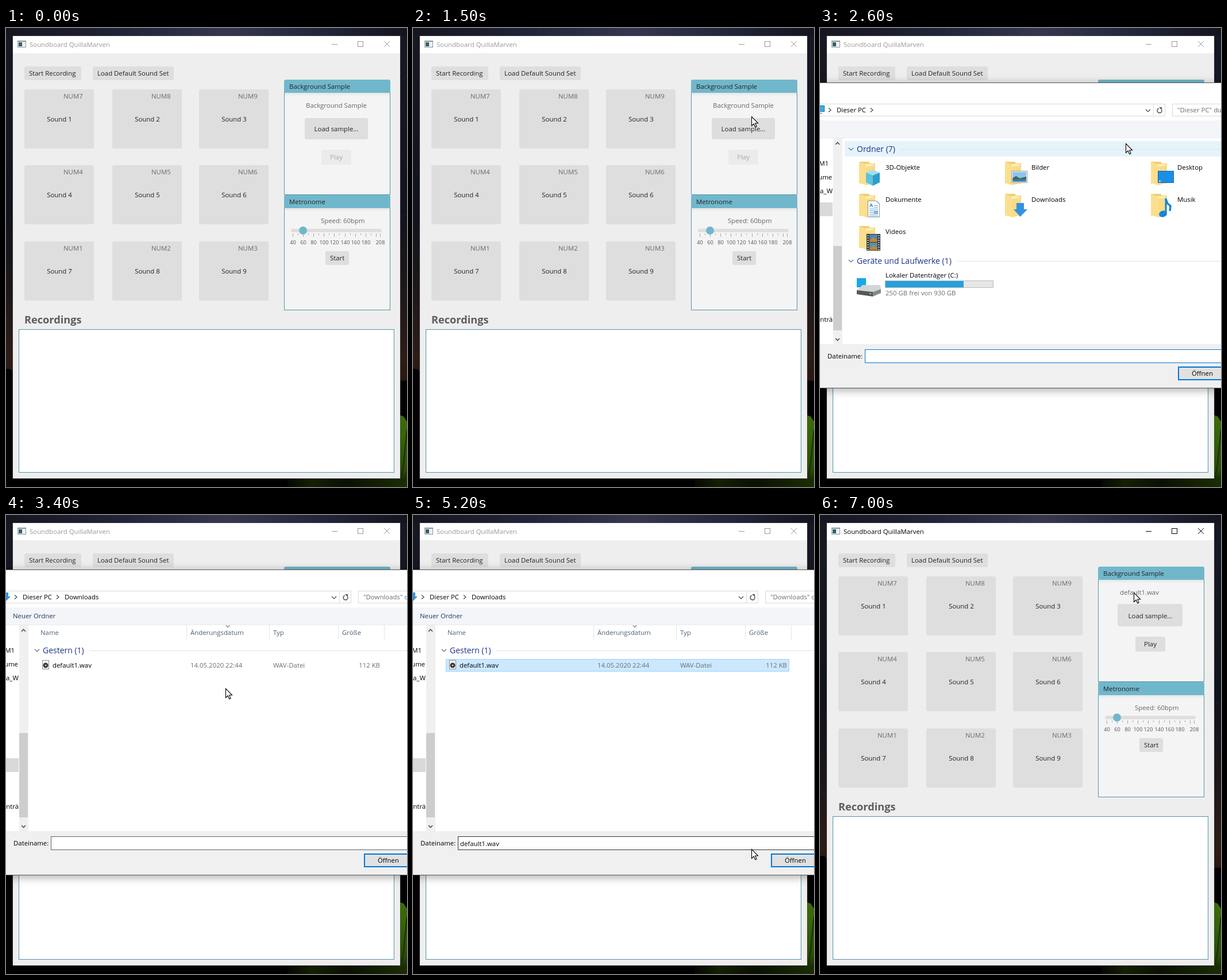
An HTML page with a canvas for the animation above (7.1 s loop, 698x800 px).

```html
<!DOCTYPE html>
<html lang="en">
<head>
<meta charset="utf-8">
<title>Soundboard</title>
<style>
html, body { margin: 0; width: 100%; height: 100%; overflow: hidden; background: #000; }
canvas { display: block; width: 698px; height: 800px; }
</style>
</head>
<body>
<canvas id="stage" width="698" height="800"></canvas>
<script>
const W = 698, H = 800, LOOP = 7100, STEP = 100, PAD = 100;
const TEAL = '#71b7cb', EDGE = '#5295a8', GREY = '#dedede', BLUE = '#0078d7';
const stage = document.getElementById('stage').getContext('2d');
let g = stage;

function layer(w) {
  const c = document.createElement('canvas');
  c.width = w;
  c.height = H;
  return c;
}
const desktop = layer(W), sheet = layer(W + 2 * PAD);

// drawing helpers
function box(x, y, w, h, fill, r = 0) {
  g.fillStyle = fill;
  g.beginPath();
  g.roundRect(x, y, w, h, r);
  g.fill();
}
function frame(x, y, w, h, color) {
  g.strokeStyle = color;
  g.lineWidth = 1;
  g.strokeRect(x + 0.5, y + 0.5, w - 1, h - 1);
}
function text(s, x, y, color = '#222', size = 11.4, align = 'left', weight = 400) {
  g.font = `${weight} ${size}px "Open Sans", "Noto Sans", sans-serif`;
  g.textAlign = align;
  g.fillStyle = color;
  g.fillText(s, x, y);
}
function trace(pts) {
  g.beginPath();
  for (let i = 0; i < pts.length; i += 2) g.lineTo(pts[i], pts[i + 1]);
}
function poly(pts, fill) {
  trace(pts);
  g.closePath();
  g.fillStyle = fill;
  g.fill();
}
function line(pts, color, width = 1) {
  trace(pts);
  g.strokeStyle = color;
  g.lineWidth = width;
  g.stroke();
}
function disc(x, y, r, fill) {
  g.fillStyle = fill;
  g.beginPath();
  g.arc(x, y, r, 0, 7);
  g.fill();
}
function ramp(x0, y0, x1, y1, stops) {
  const gr = g.createLinearGradient(x0, y0, x1, y1);
  stops.forEach(([p, c]) => gr.addColorStop(p, c));
  return gr;
}
const down = (x, y, color, s = 4) => line([x - s, y - s / 2, x, y + s / 2, x + s, y - s / 2], color, 1.2);
const right = (x, y) => line([x - 2, y - 3.5, x + 2, y, x - 2, y + 3.5], '#444', 1.2);

function paintDesktop() {
  g = desktop.getContext('2d');
  box(0, 0, W, H, ramp(0, 0, 0, H, [[0, '#161823'], [0.4, '#11131c'], [0.58, '#1d1719'],
    [0.72, '#2c1c16'], [0.765, '#2a1810'], [0.78, '#040404'], [1, '#000']]));
  box(0, 0, W, 14, ramp(0, 0, W, 0, [[0, '#14161f'], [0.3, '#22243a'], [0.55, '#36374e'],
    [0.8, '#22243a'], [1, '#12141d']]));
  let seed = 11;
  const rnd = () => (seed = seed * 16807 % 2147483647) / 2147483647;
  for (let i = 0; i < 900; i++) {
    const x = rnd() * W, y = rnd() * 560, a = rnd() * 0.3;
    if (y < 14 || x < 12 || x > 686) box(x, y, 1, 1, `rgba(190,195,225,${a})`);
  }
  box(0, 594, 12, 206, '#020202', [0, 8, 0, 0]);
  box(686, 615, 12, 185, '#020202');
  poly([686, 675, 692, 677, 698, 686, 698, 800, 686, 800],
    ramp(0, 675, 0, 800, [[0, '#3c6d08'], [0.3, '#366406'], [0.75, '#284b05'], [1, '#0d1802']]));
  box(490, 785, 208, 15, ramp(490, 0, 698, 0, [[0, '#050802'], [0.2, '#141f04'], [0.5, '#0a1003'], [1, '#1b2d04']]));
  line([687, 790, 692, 760, 698, 700], '#192d04', 2);
}

function button(label, x, y, w, h, tx, base) {
  box(x, y, w, h, GREY, 3);
  text(label, tx, base);
}

function panel(title, y, h) {
  box(484, y, 185, h, '#f4f4f4', [3, 3, 0, 0]);
  box(485, y + 23, 183, 6, ramp(0, y + 23, 0, y + 29, [[0, '#e4e6e7'], [1, '#f4f4f4']]));
  frame(484, y + 22, 185, h - 22, EDGE);
  box(484, y, 185, 23, TEAL, [3, 3, 0, 0]);
  text(title, 493, y + 16);
}

function appWindow(active, loaded, focused) {
  const ink = active ? '#000' : '#999';
  box(11, 13, 676, 773, 'rgba(70,70,75,.55)');
  box(12, 14, 674, 771, '#eee');
  box(12, 14, 674, 30, '#fff');
  box(20, 22, 15, 12, '#8b9399');
  box(21, 24, 13, 9, '#eef2f4');
  box(22, 25, 6, 7, '#31606b');
  text('Soundboard QuillaMarven', 41, 33, ink);
  line([567, 28.5, 577, 28.5], ink);
  frame(612, 23, 10, 10, ink);
  line([658, 23, 668, 33], ink);
  line([668, 23, 658, 33], ink);

  button('Start Recording', 32, 67, 99, 24, 40, 83);
  button('Load Default Sound Set', 151, 67, 141, 24, 159, 83);
  [107, 239, 372].forEach((y, r) => [32, 185, 336].forEach((x, c) => {
    box(x, y, 121, 103, GREY, 3);
    text('NUM' + (7 - 3 * r + c), x + 68, y + 16, '#696969');
    text('Sound ' + (3 * r + c + 1), x + 61, y + 56, '#222', 11.4, 'center');
  }));

  panel('Background Sample', 90, 201);
  text(loaded ? 'default1.wav' : 'Background Sample', 522, 139, '#666');
  if (focused) box(518, 155, 113, 39, GREY, 4);
  else box(520, 157, 110, 37, GREY, 3);
  text('Load sample...', 575, 180, '#222', 11.4, 'center');
  box(549, 212, 52, 26, loaded ? GREY : '#ebebeb', 3);
  text('Play', 575, 229, loaded ? '#222' : '#a9a9a9', 11.4, 'center');

  panel('Metronome', 291, 201);
  text('Speed: 60bpm', 548, 340, '#666');
  box(496, 350, 158, 6, GREY, 3);
  for (let bpm = 40; bpm <= 208; bpm += bpm < 200 ? 10 : 8) {
    const x = Math.round(499 + (bpm - 40) * 0.905), major = bpm % 20 === 0 || bpm === 208;
    box(x, 358, 1, major ? 6 : 3, '#a8a8a8');
    if (major && bpm !== 200) text(bpm, x + 0.5, 377, '#555', 9.2, 'center');
  }
  disc(517, 353, 7, TEAL);
  button('Start', 556, 389, 41, 24, 564, 405);

  text('Recordings', 32, 515, '#5f5b5f', 18.2, 'left', 700);
  box(22, 525, 654, 250, '#fff');
  frame(22, 525, 654, 250, EDGE);
}

const badges = {
  '3D-Objekte'() {
    poly([12, 20, 24, 15, 36, 20, 24, 25], '#9fe0f2');
    poly([12, 20, 24, 25, 24, 43, 12, 37], '#5fc0e0');
    poly([36, 20, 24, 25, 24, 43, 36, 37], '#2f9dc8');
  },
  Bilder() {
    box(11, 17, 28, 21, '#fff');
    frame(11, 17, 28, 21, '#999');
    box(13, 19, 24, 17, '#8cc4ee');
    poly([13, 30, 19, 26, 26, 30, 37, 27, 37, 32, 13, 32], '#3f6a55');
    box(13, 32, 24, 4, '#3f80b8');
  },
  Desktop() {
    box(12, 17, 28, 21, '#0b67b8');
    box(13, 18, 26, 19, '#1a8fe6');
    box(14, 34, 3, 2, '#d4ecff');
  },
  Dokumente() {
    poly([15, 13, 31, 13, 36, 18, 36, 42, 15, 42], '#8f9aa3');
    poly([16, 14, 30, 14, 35, 19, 35, 41, 16, 41], '#fff');
    text('A', 18, 24, '#2c82c9', 9, 'left', 700);
    for (let y = 21; y < 40; y += 3) box(y < 26 ? 26 : 18, y, y < 26 ? 7 : 15, 1, '#6aa2cf');
    box(26, 30, 7, 7, '#86b8dd');
  },
  Downloads() {
    poly([20, 17, 33, 17, 33, 28, 39, 28, 26.5, 41, 15, 28, 20, 28], '#3392e0');
  },
  Musik() {
    line([26, 37, 26, 9], '#1487d8', 3);
    line([26, 10, 29, 18, 34, 22, 33, 31], '#1487d8', 3.5);
    g.fillStyle = '#1487d8';
    g.beginPath();
    g.ellipse(21, 36, 7, 5.5, -0.3, 0, 7);
    g.fill();
  },
  Videos() {
    box(13, 15, 24, 29, '#333');
    box(18, 16, 14, 13, '#4b86b4');
    box(18, 30, 14, 13, '#5b8db0');
    poly([18, 27, 25, 20, 32, 26, 32, 29, 18, 29], '#b88b35');
    poly([18, 41, 26, 34, 32, 40, 32, 43, 18, 43], '#b88b35');
    for (let y = 17; y < 43; y += 4) {
      box(14.5, y, 2, 2, '#eee');
      box(33.5, y, 2, 2, '#eee');
    }
  }
};

function folder(name, x, y) {
  g.save();
  g.translate(x, y);
  poly([0, 1, 17, 1, 19, 4, 28, 4, 28, 39, 0, 39], '#f0cf72');
  poly([11, 5, 26, 5, 26, 37, 11, 37], '#fbeeb8');
  poly([0, 1, 12, 6, 13, 42, 0, 38], '#fbdf8c');
  poly([12, 10, 28, 7, 28, 38, 13, 42], '#f8dc86');
  badges[name]();
  g.restore();
  text(name, x + 46, y + 15, '#000');
}

function group(label, y, from) {
  down(54, y, '#5a6b8c');
  text(label, 64, y + 5, '#1e3287', 14);
  box(from, y, 760 - from, 1, '#e2e2e2');
}

function placesView(cur) {
  if (inside(cur, 43, 197, 760, 225)) box(43, 197, 717, 27, '#e5f3fb');
  if (inside(cur, 317, 284, 566, 336)) box(317, 284, 249, 52, '#e5f3ff');
  group('Ordner (7)', 211, 139);
  Object.keys(badges).forEach((name, i) => folder(name, 68 + 254 * (i % 3), 232 + 56 * Math.floor(i / 3)));
  group('Geräte und Laufwerke (1)', 406, 237);
  box(64, 436, 16, 16, '#19a7e8');
  poly([64, 457, 74, 448, 105, 448, 106, 455, 92, 460], '#d2d4d6');
  poly([64, 457, 92, 460, 92, 468, 64, 464], '#55585b');
  poly([92, 460, 106, 455, 106, 462, 92, 468], '#85898c');
  box(86, 462, 3, 2, '#5fe36a');
  text('Lokaler Datenträger (C:)', 114, 435, '#000');
  box(113, 440, 189, 13, '#e6e6e6');
  box(114, 441, 136, 11, '#26a0da');
  frame(113, 440, 189, 13, '#bcbcbc');
  text('250 GB frei von 930 GB', 114, 466, '#6d6d6d');
}

function filesView(cur, picked) {
  [['Name', 60], ['Änderungsdatum', 321], ['Typ', 465], ['Größe', 585]].forEach(([s, x]) => text(s, x, 209, '#4c607a'));
  [314, 458, 578, 658].forEach(x => box(x, 192, 1, 25, '#e5e5e5'));
  down(386, 194, '#777', 3);
  group('Gestern (1)', 236, 145);
  if (picked) {
    box(57, 251, 598, 22, '#cce8ff');
    frame(57, 251, 598, 22, '#99d1ff');
  } else if (inside(cur, 57, 251, 655, 273)) box(57, 251, 598, 22, '#e5f3ff');
  box(63, 253, 12, 16, '#fafafa');
  frame(63, 253, 12, 16, '#8a8a8a');
  disc(69, 262, 4.5, '#3a3434');
  disc(69, 262, 1.5, '#e0c8a0');
  text('default1.wav', 81, 266, '#000');
  text('14.05.2020 22:44', 321, 266, '#6d6d6d');
  text('WAV-Datei', 465, 266, '#6d6d6d');
  text('112 KB', 651, 266, '#6d6d6d', 11.4, 'right');
}

function sidebar(inFiles) {
  box(-60, inFiles ? 424 : 304, 82, 24, '#d9d9d9');
  [['M1', 15, 240], ['Dokume', 21, 264], ['a_W', 22, 288], ['Datenträ', 22, 512]]
    .forEach(([s, x, y]) => text(s, x, y, '#000', 11.4, 'right'));
  box(23, 192, 16, 359, '#f0f0f0');
  box(23, 380, 15, 147, '#cdcdcd');
  line([27, 203, 30.5, 199.5, 34, 203], '#505050', 1.6);
  line([27, 541, 30.5, 544.5, 34, 541], '#505050', 1.6);
}

function dialog(t, cur) {
  const inFiles = t >= 3300, picked = t >= 4300, sent = t >= 5700;
  const place = inFiles ? 'Downloads' : 'Dieser PC';
  g = sheet.getContext('2d');
  g.setTransform(1, 0, 0, 1, PAD, 0);
  g.clearRect(-PAD, 0, W + 2 * PAD, H);
  box(-60, 95, 820, 533, '#5a5a5a');
  box(-59, 96, 818, 531, '#fff');

  frame(-40, 132, 641, 22, '#d9d9d9');
  box(580, 132, 1, 22, '#d9d9d9');
  if (inFiles) poly([-3, 135, 4, 135, 4, 142, 8, 142, 0, 150, -8, 142, -3, 142], '#3392e0');
  else {
    box(-8, 135, 16, 11, '#35647f');
    box(-7, 136, 14, 9, '#32b0ee');
    box(-4, 148, 8, 1, '#57707e');
  }
  right(17, 143);
  text('Dieser PC', 29, 147, '#000');
  right(90, 143);
  if (inFiles) text('Downloads', 102, 147, '#000');
  down(571, 144, '#444');
  g.beginPath();
  g.arc(591, 144, 4, -0.5, 4.4);
  g.strokeStyle = '#555';
  g.lineWidth = 1.5;
  g.stroke();
  poly([590, 138, 595, 138, 595, 143], '#555');
  frame(613, 132, 130, 22, '#d9d9d9');
  text(`"${place}" durchsuchen`, 622, 147, '#6d6d6d');

  box(-59, 161, 818, 30, '#f4f5f9');
  box(-59, 191, 818, 1, '#e9ebf0');
  if (inFiles) text('Neuer Ordner', 12, 180, '#1e395b');
  if (inFiles) filesView(cur, picked);
  else placesView(cur);
  sidebar(inFiles);

  box(-59, 551, 818, 76, '#f0f0f0');
  text('Dateiname:', 13, 576, '#000');
  box(78, 560, 660, 24, '#fff');
  frame(78, 560, 660, 24, picked ? '#333' : inFiles ? '#5a6472' : BLUE);
  if (sent) box(82, 564, 68, 16, BLUE);
  if (picked) text('default1.wav', 82, 577, sent ? '#fff' : '#000');
  box(623, 590, 86, 24, BLUE);
  box(625, 592, 82, 20, inside(cur, 623, 590, 709, 614) ? '#e5f1fb' : '#e1e1e1');
  text('Öffnen', 647, 606, '#000');
  g = stage;
}

// time, x, y of the pointer tip
const path = [
  [1300, 642, 660], [1400, 602, 440], [1500, 589, 154], [1700, 583, 173], [2100, 582, 175],
  [2600, 532, 201], [3100, 384, 301], [3400, 382, 302], [3600, 355, 300], [4100, 130, 260],
  [4300, 118, 258], [4400, 118, 258], [4700, 193, 308], [4900, 350, 404], [5000, 432, 470],
  [5200, 589, 582], [5500, 640, 602], [5800, 639, 603], [6000, 637, 603], [6200, 626, 545],
  [6700, 556, 160], [7000, 546, 135]
];
function pointer(t) {
  const i = path.findIndex(p => p[0] > t);
  if (i === 0) return null;
  if (i < 0) return path[path.length - 1].slice(1);
  const [t0, x0, y0] = path[i - 1], [t1, x1, y1] = path[i], k = (t - t0) / (t1 - t0);
  return [Math.round(x0 + (x1 - x0) * k), Math.round(y0 + (y1 - y0) * k)];
}
function inside(p, x0, y0, x1, y1) {
  return p && p[0] >= x0 && p[0] < x1 && p[1] >= y0 && p[1] < y1;
}
function drawPointer([x, y]) {
  g.save();
  g.translate(x + 0.5, y + 0.5);
  trace([0, 0, 0, 16, 3.7, 12.5, 6.2, 18.3, 8.6, 17.2, 6.2, 11.6, 11, 11.3]);
  g.closePath();
  g.fillStyle = '#fff';
  g.fill();
  g.strokeStyle = '#000';
  g.lineWidth = 1.1;
  g.stroke();
  g.restore();
}

// opacity and scale of the file dialog
function dialogPose(t) {
  if (t < 2100 || t > 6000) return null;
  if (t === 2100) return [0.55, 0.975];
  if (t === 5900) return [0.5, 0.978];
  if (t === 6000) return [0.06, 0.956];
  return [1, 1];
}

function draw(t) {
  const cur = pointer(t), pose = dialogPose(t);
  g = stage;
  g.drawImage(desktop, 0, 0);
  const active = (t >= 1800 && t < 2100) || t >= 5900;
  appWindow(active, t >= 5900, t >= 1800);
  if (pose) {
    const [alpha, k] = pose;
    dialog(t, cur);
    g.save();
    g.globalAlpha = alpha;
    g.translate(340, 359);
    g.scale(k, k);
    g.translate(-340 - PAD, -359);
    g.shadowColor = 'rgba(0,0,0,.35)';
    g.shadowBlur = 16;
    g.shadowOffsetY = 3;
    g.drawImage(sheet, 0, 0);
    g.restore();
  }
  if (cur) drawPointer(cur);
}

paintDesktop();
const start = performance.now();
function tick() {
  const t = (performance.now() - start) % LOOP;
  draw(Math.floor(t / STEP) * STEP);
  requestAnimationFrame(tick);
}
tick();
</script>
</body>
</html>
```
